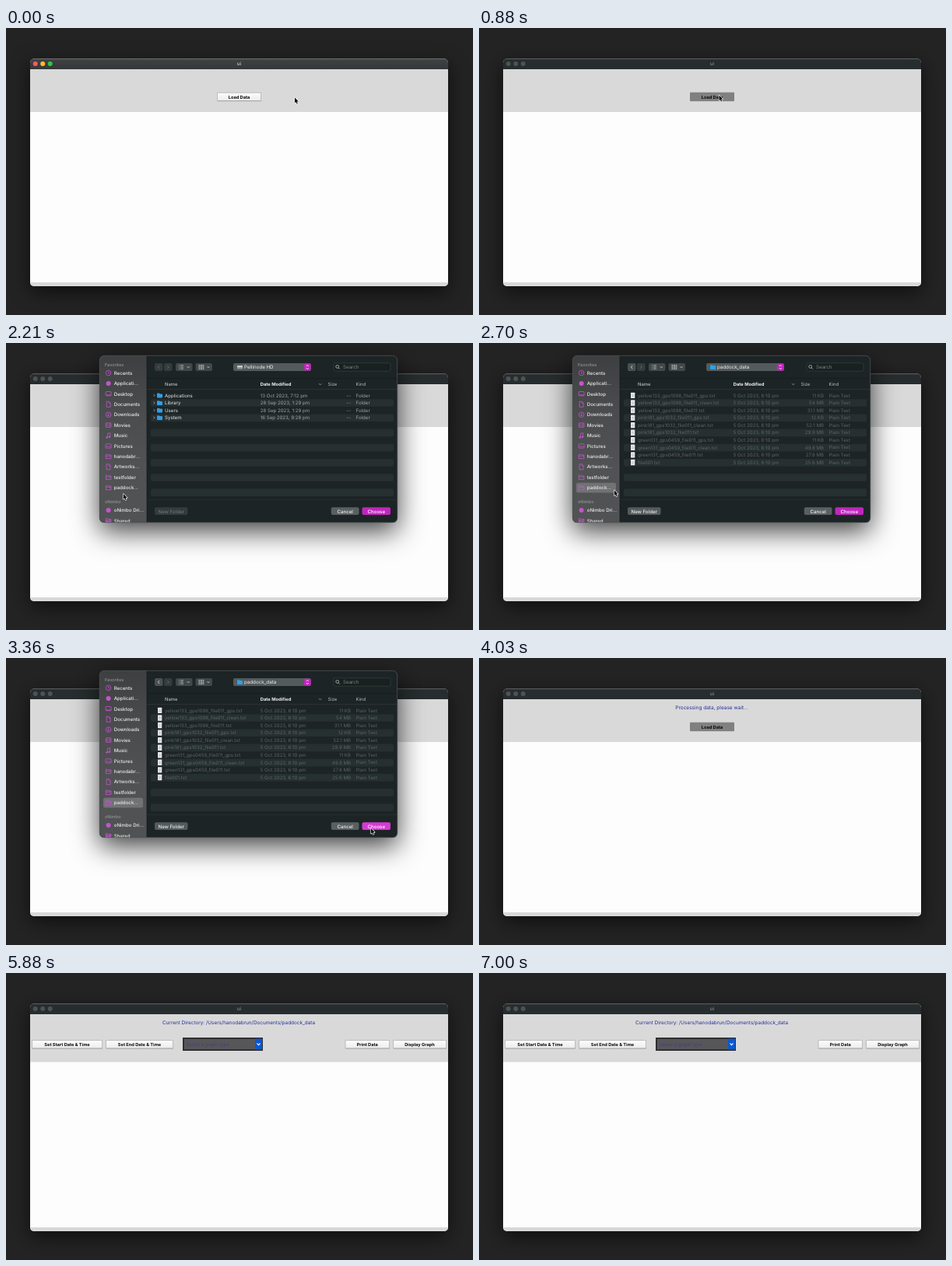
Write an HTML page with a canvas that moves like this. It is 600 px wide and 369 px high and loops after 7030 ms.

```html
<!DOCTYPE html>
<html lang="en">
<head>
<meta charset="utf-8">
<title>Load data</title>
<style>
  html, body { margin: 0; width: 100%; height: 100%; overflow: hidden; background: #232323; }
  canvas { display: block; width: 600px; height: 369px; }
</style>
</head>
<body>
<canvas id="stage" width="600" height="369"></canvas>
<script>
const ctx = document.getElementById('stage').getContext('2d');
const LOOP = 7030;
const PINK = '#c653cf', HOT = '#c026bd', BLUE = '#2f9fe8';

// Moments in ms at which the picture switches
const PRESS = 700, INACTIVE = 850, OPEN = 1120, READY = 1300, PICK = 2420,
      CONFIRM = 3300, CLOSE = 3500, BUSY = 3680, DONE = 5600;

// Cursor stops: time, x, y
const PATH = [
  [210, 371, 89.5], [680, 308.5, 86.5], [1400, 308.5, 86.5], [2150, 151, 194],
  [2220, 151, 194], [2380, 152, 187], [2600, 152, 187], [3230, 469, 219]
];

const SIDEBAR = [
  ['Recents', 'clock'], ['Applicati...', 'dot'], ['Desktop', 'screen'], ['Documents', 'page'],
  ['Downloads', 'down'], ['Movies', 'film'], ['Music', 'note'], ['Pictures', 'photo'],
  ['hanodabr...', 'folder'], ['Artworks...', 'page'], ['testfolder', 'folder'], ['paddock...', 'folder']
];
const FOLDERS = [
  ['Applications', '13 Oct 2023, 7:12 pm'], ['Library', '28 Sep 2023, 1:29 pm'],
  ['Users', '28 Sep 2023, 1:29 pm'], ['System', '16 Sep 2023, 9:28 pm']
];
const SIZES = ['11 KB', '54 MB', '31.1 MB', '12 KB', '52.1 MB', '29.9 MB', '11 KB', '49.8 MB', '27.8 MB', '25.6 MB'];
const FILES = ['yellow133_gps1098', 'pink181_gps1032', 'green131_gps0459']
  .flatMap(name => ['_gps', '_clean', ''].map(end => `${name}_file011${end}.txt`))
  .concat('file001.txt');

function box(x, y, w, h, fill, r = 0, stroke) {
  ctx.beginPath();
  ctx.roundRect(x, y, w, h, r);
  if (fill) { ctx.fillStyle = fill; ctx.fill(); }
  if (stroke) { ctx.strokeStyle = stroke; ctx.stroke(); }
}

function disc(x, y, r, fill) {
  ctx.beginPath();
  ctx.arc(x, y, r, 0, Math.PI * 2);
  ctx.fillStyle = fill;
  ctx.fill();
}

function line(points, color, width = 0.8) {
  ctx.beginPath();
  points.forEach(([x, y]) => ctx.lineTo(x, y));
  ctx.strokeStyle = color;
  ctx.lineWidth = width;
  ctx.stroke();
  ctx.lineWidth = 0.8;
}

function text(str, x, y, color, size = 6.15, weight = 400, align = 'left') {
  ctx.font = `${weight} ${size}px Inter, sans-serif`;
  ctx.textAlign = align;
  ctx.fillStyle = color;
  ctx.fillText(str, x, y + size * 0.36);
}

function chevron(x, y, w, h, color, width) {
  line([[x - w, y - h], [x, y + h], [x + w, y - h]], color, width);
}

function shade(y0, y1, ...colors) {
  const g = ctx.createLinearGradient(0, y0, 0, y1);
  colors.forEach((c, i) => g.addColorStop(i / (colors.length - 1), c));
  return g;
}

function withShadow(blur, dy, alpha, draw) {
  ctx.save();
  ctx.shadowColor = `rgba(0,0,0,${alpha})`;
  ctx.shadowBlur = blur;
  ctx.shadowOffsetY = dy;
  draw();
  ctx.restore();
}

function pushButton(label, x, y, w, pressed) {
  box(x + 0.5, y + 0.5, w - 1, 10.5, pressed ? '#808080' : shade(y, y + 11, '#fdfdfd', '#ececec'), 0,
    pressed ? '#747474' : '#b2b2b2');
  if (!pressed) line([[x + 1, y + 11], [x + w, y + 11]], '#9c9c9c', 0.7);
  text(label, x + w / 2, y + 5.8, '#080808', 5.65, 700, 'center');
}

function combo() {
  box(227, 83, 103, 17, '#2f2f31');
  box(229, 85, 91, 13, '#57575a');
  text('Select a graph type', 231, 91.5, '#404084', 6.1);
  box(320, 84.5, 9, 14, '#0b58d0');
  chevron(324.5, 91.5, 2, 1.1, '#fff', 1.1);
}

function appWindow(t) {
  const active = t < INACTIVE, done = t >= DONE;
  withShadow(24, 7, 0.6, () => box(31, 39.5, 537, 292.5, '#fdfdfd', 5));
  ctx.save();
  ctx.beginPath();
  ctx.roundRect(31, 39.5, 537, 292.5, 5);
  ctx.clip();
  box(31, 39, 537, 14, active ? shade(39, 53, '#414345', '#343638') : '#272d2e');
  line([[31, 40], [568, 40]], active ? '#5a5c5d' : '#454a4b', 0.7);
  box(31, 53, 537, done ? 61.5 : 55, '#d9d9d9');
  box(31, 327, 537, 6, '#d9d9d9');
  ctx.restore();
  ['#fc5b57', '#fdbc2e', '#2ac840'].forEach((c, i) =>
    disc(37.7 + i * 9.5, 46, 3, active ? c : '#4d5253'));
  text('ui', 299.5, 46, active ? '#b9babb' : '#777c7d', 6.3, 600, 'center');

  if (done) {
    text('Current Directory: /Users/hanodabrun/Documents/paddock_data', 299, 64, '#25309c', 6.4, 400, 'center');
    pushButton('Set Start Date & Time', 33, 86, 91);
    pushButton('Set End Date & Time', 128, 86, 87);
    combo();
    pushButton('Print Data', 435.5, 86, 57.5);
    pushButton('Display Graph', 497, 86, 69);
  } else {
    if (t >= BUSY) text('Processing data, please wait...', 299, 64, '#25309c', 6.5, 400, 'center');
    pushButton('Load Data', 271, 82.7, 57, t >= PRESS);
  }
}

function folder(x, y, color) {
  box(x, y - 2.8, 3.4, 2, color, 0.7);
  box(x, y - 2, 7, 5, color, 0.8);
}

const ICONS = {
  clock() {
    ctx.beginPath();
    ctx.arc(0, 0, 3.3, 0, Math.PI * 2);
    ctx.stroke();
    line([[0, -2], [0, 0.3], [1.8, 0.3]], PINK);
  },
  dot() { disc(0, 0, 3, PINK); },
  screen() { box(-3.5, -2.8, 7, 5.2, null, 1, PINK); line([[-3, 1.5], [3, 1.5]], PINK); },
  page() {
    line([[-2.5, -3.5], [0.7, -3.5], [2.5, -1.6], [2.5, 3.5], [-2.5, 3.5], [-2.5, -3.8]], PINK);
    line([[0.5, -3.5], [0.5, -1.4], [2.5, -1.4]], PINK, 0.6);
  },
  down() {
    ICONS.clock.ring();
    line([[0, -1.8], [0, 1.6]], PINK);
    chevron(0, 0.9, 1.4, 0.8, PINK);
  },
  film() {
    box(-3.4, -2.7, 6.8, 5.4, null, 0.7, PINK);
    line([[-1.8, -2.7], [-1.8, 2.7]], PINK, 0.6);
    line([[1.8, -2.7], [1.8, 2.7]], PINK, 0.6);
    line([[-1.8, 0], [1.8, 0]], PINK, 0.6);
  },
  note() {
    line([[-1.1, 2.4], [-1.1, -2.7], [2.2, -3.4], [2.2, 1.7]], PINK);
    disc(-2, 2.4, 1.2, PINK);
    disc(1.3, 1.8, 1.2, PINK);
  },
  photo() {
    box(-3.5, -2.7, 7, 5.4, null, 0.8, PINK);
    line([[-3, 2], [-0.8, -0.2], [0.7, 1.2], [1.7, 0.3], [3.2, 1.8]], PINK);
  },
  folder() {
    line([[-3.3, 2.7], [-3.3, -2.7], [-0.9, -2.7], [-0.2, -1.9], [3.3, -1.9], [3.3, 2.7], [-3.6, 2.7]], PINK);
    line([[-3.3, -0.5], [3.3, -0.5]], PINK, 0.7);
  },
  shared() { ICONS.folder(); disc(-1.7, 1.2, 1.3, PINK); disc(1.4, 1.2, 1.3, PINK); }
};
ICONS.clock.ring = () => {
  ctx.beginPath();
  ctx.arc(0, 0, 3.3, 0, Math.PI * 2);
  ctx.stroke();
};

function sideRow(label, icon, y) {
  ctx.save();
  ctx.translate(131.6, y);
  ctx.strokeStyle = PINK;
  ctx.lineWidth = 0.8;
  ICONS[icon]();
  ctx.restore();
  text(label, 138.7, y, '#ececec', 6.15, 500);
}

function sidebar(picked) {
  box(120, 16, 61, 215, shade(16, 231, '#3d3f40', '#4a4c4d', '#505253', '#505253'));
  line([[181, 16], [181, 231]], '#141919', 0.7);
  text('Favorites', 127, 28, '#929495', 5.5, 500);
  if (picked) box(125, 179.8, 51, 12.6, '#707273', 2.5);
  SIDEBAR.forEach(([label, icon], i) => sideRow(label, icon, 38.5 + i * 13.42));
  text('oNimbo', 127, 204.3, '#929495', 5.5, 500);
  sideRow('oNimbo Dri...', 'dot', 215);
  sideRow('Shared', 'shared', 228.4);
}

function toolbar(picked) {
  box(191, 26, 10.5, 10, picked ? '#4b5152' : '#353c3d', 2);
  box(203, 26, 10.5, 10, '#353c3d', 2);
  line([[197.2, 29], [195.3, 31], [197.2, 33]], picked ? '#e0e0e0' : '#6d7374');
  line([[207.3, 29], [209.2, 31], [207.3, 33]], '#6d7374');
  box(218, 26, 21.5, 10, '#424849', 2);
  box(243.5, 26, 21.5, 10, '#424849', 2);
  for (let i = 0; i < 3; i++) {
    const y = 28.8 + i * 2.2;
    line([[222, y], [223, y]], '#c4c7c7');
    line([[224, y], [228, y]], '#c4c7c7');
    for (let j = 0; j < 3; j++) box(247.5 + j * 2.5, y - 0.7, 1.8, 1.5, '#b4b8b8');
  }
  chevron(234.3, 31, 1.6, 0.9, '#c4c7c7');
  chevron(260, 31, 1.6, 0.9, '#c4c7c7');

  box(292, 26, 100, 10, '#555b5c', 2.2);
  if (picked) folder(297, 31, BLUE);
  else {
    box(297, 29, 7, 3, '#c9cccc', 0.6);
    box(297, 31.2, 7, 2.2, '#8e9393', 0.5);
  }
  text(picked ? 'paddock_data' : 'Pellinode HD', 306, 31, '#f0f0f0', 6.2);
  box(383, 26.4, 8.7, 9.2, HOT, 2);
  line([[385.8, 30], [387.3, 28.4], [388.8, 30]], '#fff');
  chevron(387.3, 32.8, 1.5, 0.8, '#fff');

  box(421, 25.8, 73, 10.4, '#192020', 2.2, '#343b3c');
  ctx.beginPath();
  ctx.arc(425.7, 30.4, 1.9, 0, Math.PI * 2);
  ctx.strokeStyle = '#bfc3c3';
  ctx.stroke();
  line([[427.1, 31.8], [428.9, 33.6]], '#bfc3c3');
  text('Search', 433, 31, '#7e8485', 6.2);
}

function rowFolder(name, date, y) {
  line([[189.6, y - 1.6], [191.2, y], [189.6, y + 1.6]], '#a6abab');
  folder(194, y, BLUE);
  text(name, 204, y, '#e7e8e8');
  text(date, 326.7, y, '#a2a7a7');
  text('--', 443, y, '#a2a7a7', 6.15, 400, 'right');
  text('Folder', 449.5, y, '#a2a7a7');
}

function rowFile(name, size, y) {
  const dim = '#5e6566';
  box(195, y - 3.7, 5.3, 7.4, '#e6e7e7', 0.5);
  line([[196.2, y - 0.5], [199, y - 0.5]], '#a0a3a3', 0.5);
  line([[196.2, y + 1], [199, y + 1]], '#a0a3a3', 0.5);
  text(name, 204, y, dim);
  text('5 Oct 2023, 6:10 pm', 326.7, y, dim);
  text(size, 443, y, dim, 6.15, 400, 'right');
  text('Plain Text', 449.5, y, dim, 6);
}

function fileList(picked) {
  const head = '#b9bdbd';
  text('Name', 204, 53, head, 5.9, 500);
  text('Date Modified', 326.7, 53, '#f0f0f0', 5.8, 700);
  chevron(403.7, 53, 1.6, 0.8, head, 0.7);
  text('Size', 413.5, 53, head, 5.9);
  text('Kind', 449.5, 53, head, 5.9);
  line([[181, 59.5], [503, 59.5]], '#30383a', 0.7);
  for (let i = 1; i < 14; i += 2) box(186, 62.6 + i * 9.6, 312, 9.6, '#263030', 2);
  const rowY = i => 67.4 + i * 9.56;
  if (picked) FILES.forEach((f, i) => rowFile(f, SIZES[i], rowY(i)));
  else FOLDERS.forEach(([name, date], i) => rowFolder(name, date, rowY(i)));
}

function dialogButton(label, x, w, fill, color) {
  box(x, 211.3, w, 9.8, fill, 2);
  text(label, x + w / 2, 216.3, color, 6.15, 500, 'center');
}

function dialog(t) {
  const picked = t >= PICK;
  withShadow(34, 11, 0.75, () => box(120, 16, 383, 215, '#1d2425', 6));
  ctx.save();
  ctx.beginPath();
  ctx.roundRect(120, 16, 383, 215, 6);
  ctx.clip();
  sidebar(picked);
  toolbar(picked);
  line([[181, 45.5], [503, 45.5]], '#141a1b', 0.7);
  fileList(picked);
  line([[181, 201.5], [503, 201.5]], '#2a3233', 0.7);
  if (picked) dialogButton('New Folder', 191, 42.5, '#555b5c', '#eeeeee');
  else dialogButton('New Folder', 191, 42.5, '#343b3c', '#6d7374');
  dialogButton('Cancel', 417.8, 35.7, '#5a6061', '#f2f2f2');
  if (t < READY) dialogButton('Choose', 457.5, 36.5, '#3a4142', '#7d8384');
  else dialogButton('Choose', 457.5, 36.5, t >= CONFIRM ? '#d53bd2' : HOT, '#ffffff');
  ctx.restore();
  box(120.3, 16.3, 382.4, 214.4, null, 6, '#4c5253');
}

function cursorAt(t) {
  let [, x, y] = PATH[0];
  for (let i = 1; i < PATH.length; i++) {
    const [t0, x0, y0] = PATH[i - 1], [t1, x1, y1] = PATH[i];
    if (t < t0) break;
    const p = Math.min(1, (t - t0) / (t1 - t0));
    const e = p * p * (3 - 2 * p);
    x = x0 + (x1 - x0) * e;
    y = y0 + (y1 - y0) * e;
  }
  return [x, y];
}

function cursor(t) {
  ctx.save();
  ctx.translate(...cursorAt(t));
  ctx.beginPath();
  [[0, 0], [0, 6.8], [1.5, 5.5], [2.6, 8], [3.7, 7.5], [2.7, 5.1], [4.7, 5]]
    .forEach(([x, y]) => ctx.lineTo(x, y));
  ctx.closePath();
  ctx.lineWidth = 1.3;
  ctx.lineJoin = 'round';
  ctx.strokeStyle = '#f4f4f4';
  ctx.stroke();
  ctx.fillStyle = '#050505';
  ctx.fill();
  ctx.restore();
}

function draw(t) {
  ctx.lineWidth = 0.8;
  ctx.textRendering = 'geometricPrecision';
  box(0, 0, 600, 369, '#232323');
  appWindow(t);
  if (t >= OPEN && t < CLOSE) dialog(t);
  if (t < CLOSE) cursor(t);
}

function frame(now) {
  draw(now % LOOP);
  requestAnimationFrame(frame);
}
requestAnimationFrame(frame);
</script>
</body>
</html>
```
